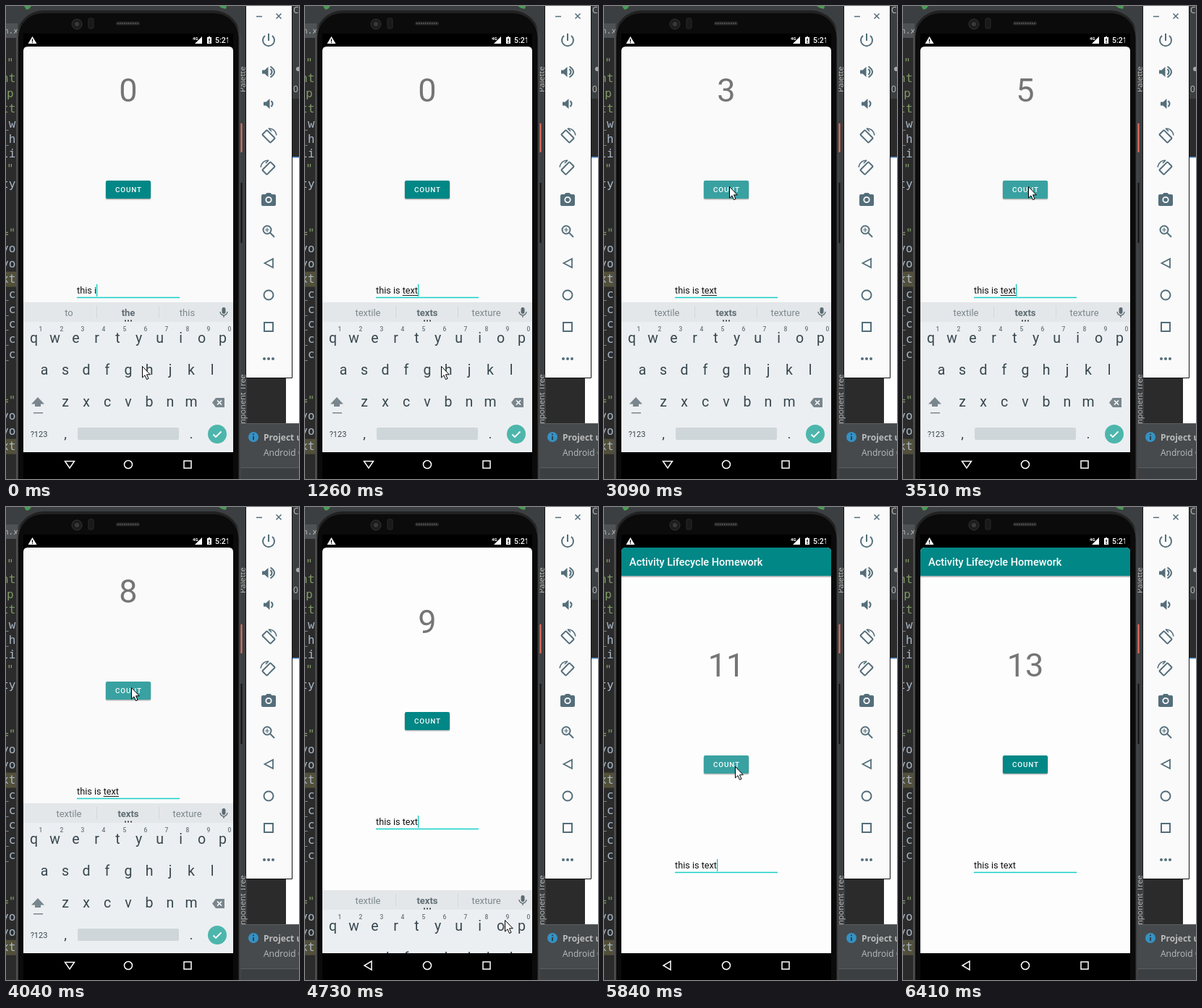
An HTML page for the animation above (6690 ms loop, 405 by 653 pixels).

```html
<!DOCTYPE html>
<html lang="en">
<head>
<meta charset="utf-8">
<title>Counter app in emulator</title>
<style>
html, body { margin: 0; width: 100%; height: 100%; overflow: hidden; background: #2b2b2b; }
svg { display: block; width: 405px; height: 653px; font-family: Roboto, sans-serif; }
text { white-space: pre; }
.mid { text-anchor: middle; }
.code { font: 16px "DejaVu Sans Mono", monospace; }
.ide { font-family: "Open Sans", "Noto Sans", sans-serif; fill: #bbb; }
.line { fill: none; stroke: #546e7a; stroke-width: 2; }
</style>
</head>
<body>
<svg viewBox="0 0 405 653">
  <defs>
    <clipPath id="screen"><path d="M24 616V62q0-6 6-6H308q6 0 6 6V616z"/></clipPath>
    <clipPath id="gutter"><path d="M0 0H16V653H0z"/></clipPath>
    <linearGradient id="rim"><stop stop-color="#555"/><stop offset=".02" stop-color="#222"/><stop offset=".98" stop-color="#222"/><stop offset="1" stop-color="#4a4a4a"/></linearGradient>
  </defs>

  <!-- IDE behind the phone -->
  <path fill="#2b2b2b" d="M0 0H405V653H0z"/>
  <path fill="#3c3f41" d="M0 0H405V44H0zM316 0H333V653H316zM396 0H405V128H396zM324 637H405V653H324z"/>
  <path fill="#4e5254" d="M0 24H16V44H0z"/>
  <path fill="#499c54" d="M25 0H35L32 4 28 5zM294 0H305L304 4 299 3z"/>
  <g id="code" class="code" clip-path="url(#gutter)"></g>
  <path fill="#fff" d="M387 209H405V576H387z"/>
  <path fill="#4a88c7" d="M387 208H405V209.5H387z"/>
  <g class="ide" font-size="11">
    <text transform="translate(331 119)rotate(-90)">Palette</text>
    <text transform="translate(331 594)rotate(-90)">Component Tree</text>
    <text x="397" y="10" font-size="12">C</text>
    <text x="397" y="119" font-size="12">0</text>
  </g>
  <circle cx="404" cy="87" r="3" fill="#aaa"/>
  <path fill="#464a4d" stroke="#5a5e60" d="M320 576.5H406V637.5H320z"/>
  <circle cx="342" cy="595" r="7" fill="#3592c4"/>
  <path stroke="#2b3a44" stroke-width="1.8" d="M342 594V599M342 590.5V592.3"/>
  <g class="ide" font-size="12">
    <text x="356" y="600" font-weight="bold">Project update</text>
    <text x="356" y="621">Android Gradle</text>
  </g>

  <!-- phone body -->
  <path fill="#e8705f" d="M322 162H326.500V202H322z"/>
  <path fill="#111" d="M322 244H326.500V327H322z"/>
  <rect x="14" y="6" width="310.500" height="684" rx="38" fill="url(#rim)"/>
  <rect x="17" y="10" width="304.500" height="676" rx="34" fill="#0b0b0b"/>
  <path d="M24 38H314V653H24z"/>
  <circle cx="98" cy="25" r="7" fill="#1c1c1c" stroke="#333"/>
  <circle cx="98" cy="25" r="3" fill="#3a3a3a"/>
  <rect x="114" y="17" width="7" height="14" rx="1.500" fill="#191919" stroke="#2b2b2b"/>
  <rect x="152" y="21.500" width="33" height="5" rx="2.500" fill="#262626"/>
  <path stroke="#555" stroke-width="2" stroke-dasharray="1.500 1.500" d="M154 24H183"/>

  <!-- status bar -->
  <path fill="#fff" d="M36.500 42L42.500 52H30.500zM271 42V52H261zM279 43H280V42H282V43H284V52H278V43z"/>
  <path stroke="#000" stroke-width="1.300" d="M36.500 45.500V49M36.500 49.800V51M281 45V48.500M281 49.500V51"/>
  <text x="258" y="47" font-size="6" font-weight="bold" fill="#fff">4G</text>
  <svg x="288" y="38" width="19" height="18"><text x="1" y="13" font-size="10.500" font-weight="500" fill="#fff">5:21</text></svg>

  <!-- app -->
  <g clip-path="url(#screen)">
    <path id="page" d="M24 56H314V616H24z"/>
    <g id="app">
      <path fill="#bbb" d="M24 95H314V97H24z"/>
      <path fill="#018786" d="M24 56H314V95H24z"/>
      <text x="35" y="81" font-size="14.500" font-weight="500" fill="#fff">Activity Lifecycle Homework</text>
      <text id="count" class="mid" x="169" y="234" font-size="45" fill="#757575"></text>
      <rect x="137.500" y="344" width="63" height="25.500" rx="2.500" fill="#000" opacity=".25"/>
      <rect x="138" y="343" width="62" height="25" rx="2" fill="#018786"/>
      <text x="151" y="359" font-size="9.900" font-weight="500" letter-spacing=".85" fill="#fff">COUNT</text>
      <rect id="press" x="138" y="343" width="62" height="25" rx="2" fill="#fff"/>
      <text id="field" x="98" y="499" font-size="12.700" fill="#111"></text>
      <path id="compose" stroke="#222"/>
      <path stroke="#15cfc5" stroke-width="1.500" d="M98 504.500H240"/>
      <path id="caret" stroke="#03c9bb" stroke-width="1.200"/>
    </g>
    <g id="keyboard">
      <path fill="#eceff1" d="M24 409H314V616H24z"/>
      <path fill="#e4e7e9" d="M24 409H314V436H24z"/>
      <path stroke="#d3d8da" d="M125.500 414V431M211.500 414V431"/>
      <path fill="#444" d="M164 433.500h2v2h-2zm4 0h2v2h-2zm4 0h2v2h-2z"/>
      <g id="hints" class="mid" font-size="13" fill="#7b878d"></g>
      <rect x="298.500" y="416" width="5" height="9" rx="2.500" fill="#5b6a72"/>
      <path fill="none" stroke="#5b6a72" stroke-width="1.300" d="M296 422a5 5 0 0 0 10 0M301 427V430"/>
      <g id="keys" class="mid" fill="#37474f"></g>
      <path fill="#79868d" d="M44 540L53 549.500H48V553H40V549.500H35zM38 561h13v1.500H38zM285 547.500L290 541H302V554H290z"/>
      <path stroke="#fff" stroke-width="1.600" d="M292 544.500l6 6m0-6l-6 6"/>
      <rect x="99" y="582" width="140" height="17" rx="2" fill="#cfd6d9"/>
      <circle cx="292" cy="591" r="13" fill="#4db6ac"/>
      <path fill="none" stroke="#fff" stroke-width="1.800" d="M286.500 591.500l3.500 3.500 7.500-7.500"/>
    </g>
  </g>

  <!-- navigation bar -->
  <g fill="none" stroke="#fff" stroke-width="1.500">
    <path id="back"/>
    <circle cx="169" cy="633" r="5.500"/>
    <path d="M246 628H256V638H246z"/>
  </g>

  <!-- emulator toolbar -->
  <path fill="#fafafa" stroke="#111" d="M331.500 -1H395.500V513.500H331.500z"/>
  <g class="line">
    <path stroke-width="1.500" d="M346 14.500H354M373.500 10.500l7 7m0-7l-7 7"/>
    <path d="M363 38V48M358 41a8 8 0 1 0 10 0"/>
    <path id="loud" d="M365.500 87q4 4 0 8M365.500 83.500q11 7.500 0 15"/>
    <path d="M366.500 131q4 4 0 8"/>
    <g id="turn">
      <rect x="-4.500" y="-8" width="9" height="16" rx="1" transform="translate(363 180)rotate(-45)"/>
      <path stroke-width="1.600" d="M363 169q9 0 11 9.500M363 169l4 4"/>
    </g>
    <use href="#turn" transform="translate(726 44)scale(-1 1)"/>
    <circle cx="361" cy="309" r="5.500"/>
    <path d="M365 313l6 6"/>
    <path stroke-width="1.200" d="M358 309h6m-3-3v6"/>
    <path stroke-width="1.800" d="M369 349V361L357.500 355z"/>
    <circle cx="363" cy="399" r="6.500"/>
    <path d="M357 437H369V449H357z"/>
  </g>
  <g fill="#546e7a">
    <path d="M354 88.500h3.500l5-4.500v14l-5-4.500H354zM356 132.500h3.500l5-4.500v14l-5-4.500H356z"/>
    <path d="M355 260h3.500l2-2h5l2 2H371q2 0 2 2V274q0 2-2 2H355q-2 0-2-2V262q0-2 2-2z"/>
    <circle cx="357" cy="487" r="2"/><circle cx="363" cy="487" r="2"/><circle cx="369" cy="487" r="2"/>
  </g>
  <circle cx="363" cy="267.500" r="3.700" fill="#546e7a" stroke="#fafafa" stroke-width="1.800"/>

  <path id="mouse" fill="#fff" stroke="#000" d="M.5.5V16L4 12.800 6.500 18.500 9 17.400 6.500 11.800H11.300z"/>
</svg>
<script>
const LOOP = 6690, PAN = 102;
const $ = id => document.getElementById(id);
const label = (x, y, s, more = '') => `<text x="${x}" y="${y}" ${more}>${s}</text>`;

// Code fragments left of the phone: [first baseline, lines]
const blocks = [[84, '" nt p tt _w _h li " ty'], [319, '=" yo yo xt _c _c _c _c _c'], [550, '=" yo yo xt']];
$('code').innerHTML = label(-3, 38, 'n.x', 'font-size="11" fill="#bbb"') + blocks.map(([y, lines]) =>
  lines.split(' ').map((s, i) => {
    const mark = s === 'xt' ? `<path fill="#52503a" d="M0 ${y + i * 20.9 - 15}h16v21H0z"/>` : '';
    const fill = /["p]|tt|nt/.test(s) ? '#7f9a65' : '#a9b7c6';
    return mark + label(s.length < 2 ? 1 : -6, y + i * 20.9, s, `fill="${fill}"`);
  }).join('')).join('');

// Keyboard rows: [letters, first centre, baseline]
const rows = [['qwertyuiop', 38.5, 465], ['asdfghjkl', 53, 509], ['zxcvbnm', 82, 553]];
$('keys').innerHTML = rows.map(([letters, x, y], row) => [...letters].map((c, i) =>
  label(x + i * 29, y, c, 'font-size="19.5"') +
  (row ? '' : label(x + i * 29 + 9.5, 449, (i + 1) % 10, 'font-size="8.5" font-weight="500" fill="#68757c"'))
).join('')).join('') + label(45.500, 595, '?123', 'font-size="11"') +
  label(82, 597, ',', 'font-size="19"') + label(256, 597, '.', 'font-size="19"');

// Timelines: [start, value...]
const typed = [[0, 'this i'], [120, 'this is'], [360, 'this is '], [510, 'this is t'],
  [630, 'this is te'], [900, 'this is tex'], [1140, 'this is text']];
const hints = [[0, 'to the this'], [120, 'is it this'], [360, 'a the not'], [510, 'the to that'],
  [750, 'tell the test'], [900, 'texas text texts'], [1140, 'textile texts texture']];
const taps = [2340, 2720, 2970, 3230, 3500, 3630, 3890, 4040, 4160, 5690, 5840, 5980, 6110];
const blinks = [1680, 2220, 2720, 3230, 3750, 4160, 5270, 5840, 6260];
const moves = [[0, 188, 497], [1410, 165, 508], [1530, 147, 511], [1680, 137, 440], [1800, 149, 345],
  [1920, 164, 270], [2070, 171, 259], [2220, 173, 249], [4160, 316, 492], [4310, 329, 548],
  [4430, 291, 586], [4580, 286, 600], [4730, 276, 570], [4850, 225, 395], [4970, 179, 245],
  [5120, 181, 293], [5270, 181, 349], [5420, 181, 358], [6110, 202, 452], [6260, 285, 620], [6410, 500, 700]];
const pans = [[0, PAN], [4730, 60], [4850, 0]];
const drops = [[0, 0], [4730, 120], [4850, 210]];

const at = (list, t) => list.findLast(k => k[0] <= t).slice(1);
const past = (list, t) => list.filter(k => k <= t);
const shift = (id, x, y) => $(id).setAttribute('transform', `translate(${x} ${y})`);
const set = (id, name, value) => $(id).setAttribute(name, value);
let lastHints;

function draw(t) {
  const open = t < 4730;
  const [words] = at(hints, t), [text] = at(typed, t);
  if (words !== lastHints) {
    $('hints').innerHTML = words.split(' ').map((w, i) =>
      label([87, 169, 250.5][i], 428, w, i === 1 ? 'font-weight="700" fill="#5f6d74"' : '')).join('');
    lastHints = words;
  }
  $('field').textContent = text;
  const end = 98 + $('field').getComputedTextLength();
  const start = 98 + (text.length > 8 ? $('field').getSubStringLength(0, 8) : 0);
  set('compose', 'd', open && start > 98 ? `M${start} 501.500H${end}` : '');
  set('caret', 'd', past(blinks, t).length % 2 ? '' : `M${end + .6} 486V503`);

  const done = past(taps, t), age = t - (done.at(-1) ?? -LOOP);
  $('count').textContent = done.length;
  set('press', 'opacity', age < 140 ? .22 : age < 300 && t < 4310 ? .12 : 0);

  set('page', 'fill', open ? '#fafafa' : '#fdfdfd');
  shift('app', 0, -at(pans, t)[0]);
  shift('keyboard', 0, at(drops, t)[0]);
  set('back', 'd', open ? 'M81.500 628.500H94.500L88 638z' : 'M92 627V639L82 633z');
  shift('mouse', ...at(moves, t));
}

function tick() {
  draw(performance.now() % LOOP);
  requestAnimationFrame(tick);
}
tick();
</script>
</body>
</html>
```
